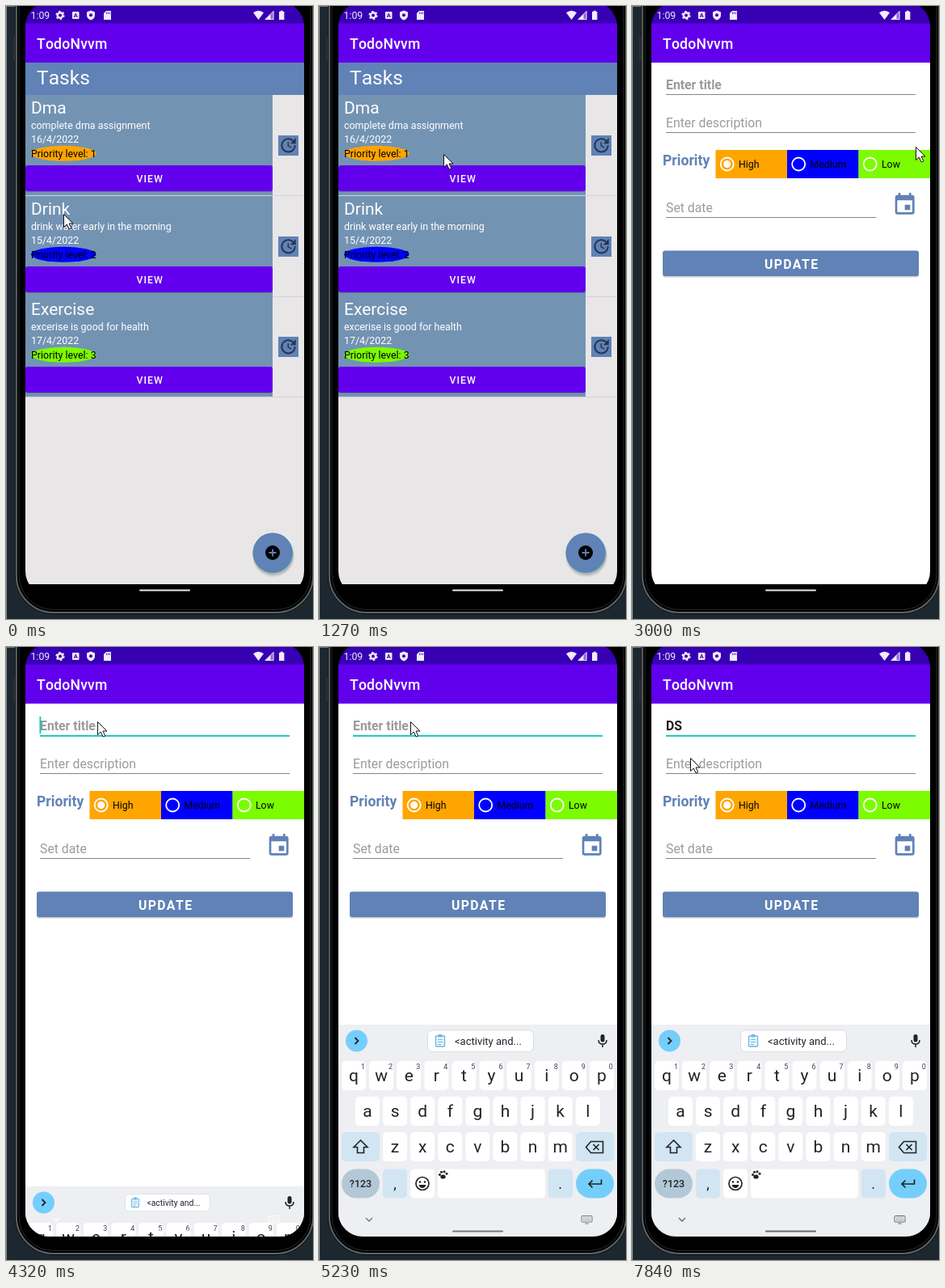
Recreate the animation shown at these times as an HTML page. Size 380 by 758 pixels, loop 7.99 s.

```html
<!DOCTYPE html>
<html lang="en">
<head>
<meta charset="utf-8">
<title>Todo app</title>
<style>
  html, body { margin: 0; height: 100%; overflow: hidden; background: #1c272f; }
  svg { display: block; width: 100vw; height: 100vh; font-family: Roboto, sans-serif; }
</style>
</head>
<body>
<svg id="stage" viewBox="0 0 380 758" preserveAspectRatio="none"></svg>
<script>
const LOOP = 7990;
const STEEL = '#6082b6', PURPLE = '#6200ee', TEAL = '#03c9b8', INK = '#202426';
const ORANGE = '#ffa500', BLUE = '#0000ff', GREEN = '#7cfc00';

const rect = (x, y, w, h, fill, r = 0, extra = '') =>
  `<rect x="${x}" y="${y}" width="${w}" height="${h}" rx="${r}" fill="${fill}" ${extra}/>`;
const circle = (x, y, r, fill, extra = '') =>
  `<circle cx="${x}" cy="${y}" r="${r}" fill="${fill}" ${extra}/>`;
const text = (x, y, size, fill, str, extra = '') =>
  `<text x="${x}" y="${y}" font-size="${size}" fill="${fill}" ${extra}>${str}</text>`;
const path = (d, fill, extra = '') => `<path d="${d}" fill="${fill}" ${extra}/>`;
const line = (d, stroke, width = 1.6, extra = '') =>
  path(d, 'none', `stroke="${stroke}" stroke-width="${width}" ${extra}`);
const group = (body, extra = '') => `<g ${extra}>${body}</g>`;
const at = (x, y, body, scale = 1) =>
  group(body, `transform="translate(${x} ${y}) scale(${scale})"`);

const MID = 'text-anchor="middle"', BOLD = 'font-weight="700"', MEDIUM = 'font-weight="500"';
const UNKERNED = 'style="font-kerning:none"';
const UPDATE_ICON = 'M21 10.12h-6.78l2.74-2.82c-2.73-2.7-7.15-2.8-9.88-.1-2.73 2.71-2.73 7.08 0 9.79s7.15 2.71 9.88 0C18.32 15.65 19 14.08 19 12.1h2c0 1.98-.88 4.55-2.64 6.29-3.51 3.48-9.21 3.48-12.72 0-3.5-3.47-3.53-9.11-.02-12.58s9.14-3.47 12.65 0L21 3v7.12zM12.5 8v4.25l3.5 2.08-.72 1.21L11 13V8h1.5z';
const EVENT_ICON = 'M17 12h-5v5h5v-5zM16 1v2H8V1H6v2H5c-1.1 0-2 .9-2 2v14c0 1.1.9 2 2 2h14c1.1 0 2-.9 2-2V5c0-1.1-.9-2-2-2h-1V1h-2zm3 18H5V8h14v11z';

function phone() {
  return rect(0, 0, 380, 1, '#70777c') + rect(0, 0, 1, 758, '#8b9195')
    + rect(9, 38, 3, 30, '#2c3338', 1)
    + rect(11, -80, 371, 832, '#0b0d0e', 48)
    + rect(12.8, -80, 367.4, 830, '#000', 46, 'stroke="#5f6366" stroke-width="2"')
    + rect(16, -80, 361, 826.5, 'none', 43, 'stroke="#26292b" stroke-width="1"');
}

function statusBar() {
  const c = '#f1ebfb';
  return rect(24, -8, 345, 30, '#3700b3') + rect(24, 21.5, 345, 48.5, PURPLE)
    + text(30.5, 16, 12.3, c, '1:09')
    + circle(67, 11.5, 3.2, 'none', `stroke="${c}" stroke-width="2.4"`)
    + circle(67, 11.5, 4.8, 'none', `stroke="${c}" stroke-width="1.6" stroke-dasharray="2.5 2.53"`)
    + rect(82, 7, 8.5, 9, c, 1) + text(86.2, 14.3, 7.5, '#3700b3', 'A', MID + ' ' + BOLD)
    + path('M105 5.5l5 2v4q0 4-5 6q-5-2-5-6v-4z', c) + circle(105, 11.3, 2, '#3700b3')
    + path('M124 6h6v11h-9v-8z', c) + line('M124.5 7.5v2.5M126.5 7.5v2.5M128.5 7.5v2.5', '#3700b3', .8)
    + path('M306 8.2q6.5-5 13 0l-6.5 8.8z', c)
    + path('M331.5 6v11h-11z', c, 'opacity=".45"') + path('M327.5 10v7h-7z', c)
    + line('M331 6.5V16.5H321z', c, .9)
    + path('M338 7h1.7V5.7h3V7h1.7V17h-6.4z', c)
    + text(38, 53, 17.6, '#fff', 'TodoNvvm', MEDIUM + ' letter-spacing=".2" ' + UNKERNED);
}

function task(i, title, note, date, color) {
  const label = (y, str, fill = '#fff') => text(31, y, 12.45, fill, str);
  return at(0, Math.round(i * 124.5),
    rect(24, 110, 306, 124, '#7393b3')
    + rect(24, 234, 345, 1, '#d2d4d8')
    + text(31, 133, 21, '#fff', title)
    + label(152, note) + label(169, date)
    + `<ellipse cx="71.3" cy="182.2" rx="40.3" ry="9.5" fill="${color}"/>`
    + label(187, 'Priority level: ' + (i + 1), '#000')
    + rect(24, 198, 306, 32, '#465a78', 3, 'opacity=".5"')
    + rect(24, 197, 306, 32, PURPLE, 3)
    + text(178.2, 218, 12.3, '#fff', 'VIEW', MID + ' ' + MEDIUM + ' letter-spacing="1.1"')
    + rect(337, 160, 25, 25, STEEL)
    + at(337.3, 160, path(UPDATE_ICON, '#26344d'), 1.02));
}

function listScreen() {
  return rect(24, 70, 345, 645, '#e8e6e7') + rect(24, 70, 345, 40, STEEL)
    + text(38, 97, 24.6, '#fff', 'Tasks', UNKERNED)
    + task(0, 'Dma', 'complete dma assignment', '16/4/2022', ORANGE)
    + task(1, 'Drink', 'drink water early in the morning', '15/4/2022', BLUE)
    + task(2, 'Exercise', 'excerise is good for health', '17/4/2022', GREEN)
    + circle(331, 680, 26, '#000', 'opacity=".08"') + circle(331, 679, 25, '#000', 'opacity=".14"')
    + circle(330.3, 676.5, 24.7, '#25b5bd') + circle(330, 676, 24.5, STEEL)
    + circle(330, 676, 9, '#000') + line('M325.5 676h9M330 671.5v9', STEEL, 1.8);
}

function radio(i, label, color) {
  const x = 103.5 + i * 88.5;
  return rect(x, 178, 88.6, 35, color)
    + circle(x + 14.2, 195.5, 8, 'none', 'stroke="#fff" stroke-width="1.8"')
    + (i ? '' : circle(x + 14.2, 195.5, 4.5, '#fff'))
    + text(x + 28.5, 200, 12.3, '#000', label);
}

function formScreen() {
  const hint = '#9b9b9b';
  return rect(24, 70, 345, 645, '#fff')
    + text(42, 103, 15.8, hint, 'Enter title', BOLD + ' id="title"')
    + rect(42, 109, 309, 1, '#858585', 0, 'id="underline"')
    + rect(41.5, 86, 1.8, 21, TEAL, 0, 'id="caret"')
    + text(42, 150, 15.8, hint, 'Enter description') + rect(42, 156, 309, 1, '#858585')
    + text(38, 197, 17.6, STEEL, 'Priority', BOLD)
    + radio(0, 'High', ORANGE) + radio(1, 'Medium', BLUE) + radio(2, 'Low', GREEN)
    + text(42, 255, 15.8, hint, 'Set date') + rect(42, 261, 260, 1, '#858585')
    + at(321.7, 229.7, path(EVENT_ICON, STEEL), 1.33)
    + rect(38, 304, 317, 31.5, '#000', 3, 'opacity=".2"') + rect(38, 302.5, 317, 31.5, STEEL, 3)
    + text(197.7, 325, 15.8, '#fff', 'UPDATE', MID + ' ' + BOLD + ' letter-spacing="1.4"');
}

function keyboard() {
  const pale = '#d2e5f3', sky = '#74cefc';
  const key = (x, y, w, fill = '#fff', r = 5) => rect(x, y, w, 36, fill, r);
  const row = (letters, first, y) => [...letters].map((ch, i) => {
    const x = first + i * 34.1;
    return key(x - 15, y, 30) + text(x, y + 24.5, 21, INK, ch, MID);
  }).join('');
  const digits = [...'1234567890'].map((d, i) => text(54.5 + i * 34.1, 522, 9, '#3c4043', d, MID)).join('');
  const paw = `<ellipse cx="153.5" cy="655" rx="3.2" ry="2.6" fill="${INK}"/>`
    + [[149.5, 652.5], [151.5, 649.3], [155, 648.8], [158, 651.3]]
      .map(([x, y]) => circle(x, y, 1.5, INK)).join('');
  const chip = rect(134.5, 474, 131, 26.5, '#fff', 6, 'stroke="#d9dce0"')
    + rect(144.5, 481, 11, 13, '#e8f6fd', 1, 'stroke="#6fb9dd" stroke-width="1.4"')
    + rect(147.5, 479, 5, 3.5, '#6fb9dd', 1)
    + line('M147 485.5h6M147 488.5h6M147 491.5h4', '#6fb9dd', 1)
    + text(168, 492, 13, INK, '&lt;activity and...');
  return rect(24, 467, 345, 270, '#eeeff2')
    + circle(46.5, 487, 13.5, sky) + line('M44.5 483l4 4l-4 4', INK, 1.8)
    + group(chip, 'id="chip"')
    + rect(348.5, 479, 5, 9.5, INK, 2.5) + line('M346 486q0 5 5 5t5-5M351 491v4', INK, 1.5)
    + row('qwertyuiop', 43, 512) + digits + row('asdfghjkl', 60, 556) + row('zxcvbnm', 94, 600)
    + key(28, 600, 47, pale) + line('M51.5 610l-8.5 8.5h4.5v7h8v-7h4.5z', INK)
    + key(318, 600, 47, pale) + line('M336.5 611.5h15v14h-15l-6-7zM339.5 615l7 7M346.5 615l-7 7', INK)
    + key(28, 645.5, 47, '#b3c8d7', 18) + text(51.5, 668, 12.5, INK, '?123', MID + ' ' + MEDIUM)
    + key(79, 645.5, 30, pale) + text(94, 670, 18, INK, ',', MID)
    + key(113, 645.5, 30) + circle(128, 663.5, 8, 'none', `stroke="${INK}" stroke-width="1.7"`)
    + circle(125, 661.5, 1.3, INK) + circle(131, 661.5, 1.3, INK)
    + path('M123.5 665h9q-1 4-4.5 4t-4.5-4z', INK)
    + key(147, 645.5, 133) + paw
    + key(283.5, 645.5, 30.5, pale) + text(298.5, 670, 18, INK, '.', MID)
    + key(318, 645.5, 47, sky, 18) + line('M349.5 658.5v5.5h-15.5M338.5 659.5l-4.5 4.5l4.5 4.5', INK, 1.7);
}

// Navigation strip glyphs, drawn in currentColor so they can fade.
function navIcons() {
  const c = 'currentColor';
  return line('M58 706l4 4l4-4', c, 1.3)
    + rect(325, 703.5, 13, 7.5, 'none', 1, `stroke="${c}"`)
    + line('M327 706h9M327 708.5h9', c, 1.2, 'stroke-dasharray="1.2 .8"')
    + line('M329.5 713h4', c, 1);
}

const stage = document.getElementById('stage');
stage.innerHTML = `<clipPath id="screen">${rect(24, -5, 345, 734, '#000', 30)}</clipPath>`
  + phone()
  + group(
    group(listScreen(), 'id="list"') + group(formScreen(), 'id="form"') + statusBar()
    + group(keyboard(), 'id="keyboard"') + group(navIcons(), 'id="nav"')
    + rect(165, 721.5, 63, 2, '#e8e8e8', 1, 'id="home"'), 'clip-path="url(#screen)"')
  + path('M.5 .5V16.5L4.3 13L7.2 19L9.8 17.8L7 12H12z', '#fff',
    'stroke="#111" stroke-width="1" id="pointer"');

const el = Object.fromEntries([...stage.querySelectorAll('[id]')].map(n => [n.id, n]));

// [time, x, y]: the pointer holds each place until the next one.
const pointerTrack = [
  [0, 71, 257], [120, 78, 250], [240, 104, 231], [390, 132, 215], [540, 138, 213], [660, 124, 212],
  [960, 121, 209], [1110, 132, 198], [1270, 154, 183], [1390, 196, 180], [1530, 248, 178],
  [1670, 300, 176], [1810, 338, 175], [1950, 351, 174],
  [3490, 330, 164], [3630, 244, 130], [3770, 146, 99], [3910, 113, 92],
  [7280, 110, 98], [7420, 101, 111], [7560, 88, 126], [7700, 76, 135], [7840, 72, 137]];
// [time, offset from rest, chip scale]
const keyboardTrack = [[0, 270, .8], [4320, 200, .8], [4460, 60, .82], [4600, 10, .885], [4720, 2, .96], [4860, 0, 1]];
const caretTrack = [[0, 0], [4320, 1], [4860, 0], [5380, 1], [6920, 0], [7420, 1], [7840, 0]];
const titleTrack = [[0, ''], [5650, 'D'], [6210, 'DS']];

const held = (track, t) => track.findLast(step => step[0] <= t);
const show = (node, on) => node.setAttribute('display', on ? 'inline' : 'none');
const mixGrey = (from, to, k) => {
  const v = Math.round(from + (to - from) * k);
  return `rgb(${v},${v},${v})`;
};

function draw(now) {
  const t = now % LOOP;
  const focused = t >= 4320;
  const [, x, y] = held(pointerTrack, t);
  const [, drop, scale] = held(keyboardTrack, t);
  const [, typed] = held(titleTrack, t);

  show(el.list, t < 3000);
  show(el.form, t >= 3000);
  show(el.keyboard, focused);
  show(el.nav, focused);
  show(el.caret, held(caretTrack, t)[1]);
  el.pointer.setAttribute('transform', `translate(${x} ${y})`);
  el.keyboard.setAttribute('transform', `translate(0 ${drop})`);
  el.chip.setAttribute('transform', `translate(200 487) scale(${scale}) translate(-200 -487)`);

  el.title.textContent = typed || 'Enter title';
  el.title.setAttribute('fill', typed ? '#1d1d1d' : '#9b9b9b');
  el.caret.setAttribute('x', [41.5, 52, 62][typed.length]);
  el.underline.setAttribute('fill', focused ? TEAL : '#858585');
  el.underline.setAttribute('height', focused ? 1.8 : 1);

  const fade = Math.min(1, Math.max(0, (t - 4600) / 700));
  el.nav.setAttribute('color', mixGrey(255, 100, fade));
  el.home.setAttribute('fill', focused ? mixGrey(255, 105, fade) : '#e8e8e8');
}

function tick() {
  draw(performance.now());
  requestAnimationFrame(tick);
}
tick();
</script>
</body>
</html>
```
